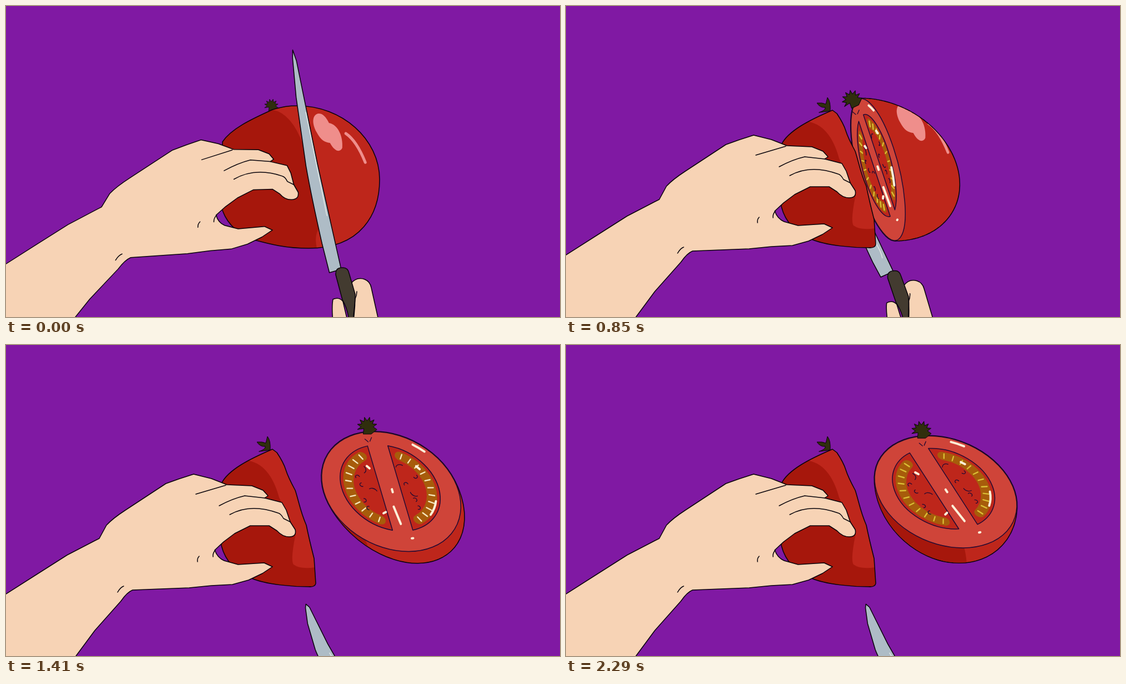
These frames come from a looping animation (998 by 561 pixels, 2370 ms). An HTML page with a canvas:

```html
<!DOCTYPE html>
<html lang="en">
<head>
<meta charset="utf-8">
<title>Slicing a tomato</title>
<style>
html, body { margin: 0; width: 100%; height: 100%; overflow: hidden; background: #8019a3; }
canvas { display: block; }
</style>
</head>
<body>
<canvas id="stage" width="998" height="561"></canvas>
<script>
const ctx = document.getElementById('stage').getContext('2d');
const LOOP = 2370;
const INK = '#08030a', PLUM = '#220a33', RED = '#be261b', DARK = '#a6170c';
const FLESH = '#cf4439', SKIN = '#f7d3b5', BLADE = '#aebcc6', LEAF = '#302e0d';
const PINK = '#ef8e8b', CREAM = '#fdf0d8', AMBER = '#a75c0b';

const { PI, sin, cos } = Math;
const P = d => new Path2D(d);
const lerp = (a, b, t) => a + (b - a) * t;
const span = (t, from, to) => Math.min(1, Math.max(0, (t - from) / (to - from)));
const rand = n => { const v = sin(n * 12.9898) * 43758.5453; return v - Math.floor(v); };

function line(path, color = INK, width = 1.5) {
  ctx.strokeStyle = color;
  ctx.lineWidth = width;
  ctx.stroke(path);
}
function fill(path, color) { ctx.fillStyle = color; ctx.fill(path); }
function shape(path, color, ink = INK, width = 1.5) { fill(path, color); line(path, ink, width); }
function scoped(draw) { ctx.save(); draw(); ctx.restore(); }
function placed(path, matrix) {
  const p = new Path2D();
  p.addPath(path, matrix);
  return p;
}
function arc(r, from, to, y = 0) {
  const p = new Path2D();
  p.arc(0, y, r, from, to);
  return p;
}

// Left hand
const hand = P('M-6 453L55 414L110 379L160 353L168 349L181 325Q192 313 215 298L288 250Q312 241 338 233L370 241L398 252L443 254L463 262L472 272L466 276L497 284L505 298L512 319L521 333Q524 346 510 346Q498 346 488 335L474 326L440 326L412 340L392 355L376 370Q381 384 393 389L418 396L465 393L480 400L462 412L437 424L408 432L370 434L330 438L228 442Q218 446 207 462L160 515L126 561L122 570L-6 570Z');
const creases = P('M342 269L396 253M384 290Q408 277 430 272L466 276M403 306Q440 285 490 303Q495 304 500 313L512 319M377 370Q372 376 373 382M348 381Q344 385 345 391M201 446Q206 437 212 435');

// Tomato before and after the cut
const whole = P('M388 362L390 245C405 222 440 205 480 187C500 181 510 180 525 180C605 180 673 240 673 313C673 375 640 437 545 437C500 437 470 428 440 420C415 408 395 390 388 362Z');
const wholeShade = P('M370 160L480 187Q515 194 535 250L565 400Q553 415 562 445L370 445Z');
const slice = P('M388 362L388 250C400 225 440 205 480 188L488 194Q500 212 504 225Q508 238 521 262C527 280 530 300 541 325Q546 350 555 385L558 430Q557 437 545 436C520 436 470 433 440 420C415 410 395 390 388 362Z');
const sliceLight = P('M433 208Q475 213 492 275L522 340Q512 388 518 396Q530 405 557 401L600 300L480 170Z');
const leaf = P('M456 192Q468 188 467 183Q458 184 452 175Q462 174 468 177L471 165Q477 172 476 189Z');
const gloss = P('M-18 -34C-30 -33 -33 -18 -22 0C-14 14 -6 18 4 19C14 36 24 36 28 28C30 8 20 -14 2 -17C-4 -28 -10 -34 -18 -34Z');
const glint = P('M35 2Q56 15 73 54');

// Knife, with the heel of the blade as its origin
const blade = P('M0 -405L3 -385L5 -195L11 0L-11 2L-14 -50Q-17 -140 -16 -195L-10 -320L-3 -390Z');
const handle = P('M1 8Q0 -5 12 -5Q23 -6 25 5L36 43Q36 68 33 90L25 90Q22 68 13 53Z');
const thumb = P('M-3 103Q-7 68 -4 52Q7 47 14 56L25 103Z');
const finger = P('M29 23Q39 11 53 16Q63 20 65 31L81 103L32 103Z');
const knuckle = P('M39 38Q39 45 36 51L33 83');

// Flesh, drawn in a unit disc with the band along the y axis
const disc = arc(1, 0, 2 * PI);
const CORE = -.06;
const sides = [0, PI];
const pockets = new Path2D(), pulp = new Path2D(), seeds = new Path2D(), curls = new Path2D();
sides.forEach((turn, k) => {
  const pocket = arc(.72, turn - 1.36, turn + 1.36, CORE);
  pocket.closePath();
  pockets.addPath(pocket);
  pulp.addPath(arc(.6, turn - 1.08, turn + 1.08, CORE));
  for (let v = -1.05; v <= 1.06; v += .21) {
    const x = cos(turn + v), y = sin(turn + v);
    seeds.moveTo(x * .56, y * .56 + CORE);
    seeds.lineTo(x * .64, y * .64 + CORE);
  }
  for (let i = 0; i < 6; i++) {
    const x = cos(turn) * (.24 + .2 * rand(i + 9 * k)), y = .13 * i - .38;
    const start = rand(i + 40 + k) * 6, r = i % 3 ? .03 : .07;
    curls.moveTo(x + r * cos(start), y + r * sin(start));
    curls.arc(x, y, r, start, start + (i % 3 ? 3.4 : 1.8));
  }
});
const sparks = P('M-.25 -.43l.03 .04M-.21 .36l.04 -.02M-.03 .25L0 .54M.1 .78h.02M.02 -.04v.05M.48 -.42l.04 .05');
sparks.addPath(arc(.94, -.98, -.78));
sparks.addPath(arc(.66, .35, .75, CORE));

const calyx = P('M7 2L-7 2L-6 -8');
for (let i = 0; i <= 14; i++) {
  const v = lerp(-3.4, .25, i / 14), r = i % 2 ? 11 : 18;
  calyx.lineTo(r * cos(v), r * sin(v) - 11);
}
calyx.closePath();
const dimple = P('M-4 11l6 5M8 8l-3 7');

function star(x, y, turn, size) {
  scoped(() => {
    ctx.translate(x, y);
    ctx.rotate(turn);
    ctx.scale(size, size);
    shape(calyx, LEAF, INK, 1);
  });
}

function knife(t) {
  const push = span(t, 0, 510) ** 2, pull = span(t, 510, 1010);
  const drop = 125 * span(t, 1010, 1330) ** 1.3;
  scoped(() => {
    ctx.translate(593 - 21 * push + 9 * pull + .2 * drop, 477 + push + 8 * pull + drop);
    scoped(() => {
      ctx.rotate(-(10.9 + 4.7 * push + 9 * pull) * PI / 180);
      const size = new DOMMatrix().scale(1 + .18 * pull, 1 - .11 * push - .5 * pull);
      shape(placed(blade, size), BLADE);
      line(P(pull ? 'M2 -60Q5 -40 3 -30' : 'M2 -290L4 -100'), '#dfe3e0', 1.6);
    });
    ctx.rotate(-.1 * pull);
    shape(finger, SKIN);
    shape(handle, '#433b30');
    shape(thumb, SKIN);
    line(knuckle);
  });
}

function highlights(x, y, squeeze) {
  scoped(() => {
    ctx.translate(x, y);
    ctx.scale(squeeze, 1);
    fill(gloss, PINK);
    line(glint, PINK, 7 * squeeze ** 3);
  });
}

// The loose half tips open, then rocks and turns until it rests.
// c: centre, a: along the band, b: across it, dome: centre to the far pole
function pose(t) {
  const open = span(t, 680, 1410) ** 1.15, rest = span(t, 1410, 2290);
  const swing = sin(PI * open);
  const rock = 7 * cos(9 * rest) * (1 - rest ** 2) * open;
  return {
    open, rest,
    spin: .26 * rest ** 2 - .4 * rest * (1 - rest),
    c: [lerp(532, 694, open) + 47 * rest * (1 - rest) - 10 * rest,
      lerp(309, 261, open) - 10 * swing + .5 * rock + 4 * rest],
    a: [32 + 15 * swing, lerp(125, 101, open) + rock],
    b: [lerp(6, 124, open) - .4 * rock, -69 * swing - 1],
    dome: [lerp(143, 39, open ** 1.8) - 39 * rest, (78 - 1.2 * rock) * open ** 3]
  };
}

// A dome is the union of its shrinking slices
function domePath({ a, b, c, dome }) {
  const p = new Path2D();
  for (let i = 0; i < 120; i++) {
    const r = cos(i / 240 * PI), s = sin(i / 240 * PI);
    p.addPath(disc, new DOMMatrix([b[0] * r, b[1] * r, a[0] * r, a[1] * r,
      c[0] + dome[0] * s, c[1] + dome[1] * s]));
  }
  return p;
}

function half(t) {
  const k = pose(t), { open, rest, c } = k;
  const skin = domePath(k);
  line(skin, INK, 3);
  fill(skin, RED);
  scoped(() => {
    ctx.clip(skin);
    const x = c[0] - 36 + 75 * rest - 200 * (1 - open);
    fill(P(`M400 150H${x - 40}L${x - 12} 350Q${x - 2} 365 ${x} 410H400Z`), DARK);
    if (open < .7) highlights(c[0] + 48 + 62 * open, c[1] - 81 - 22 * open, 1 - .5 * open);
  });

  const rim = new DOMMatrix([...k.b, ...k.a, ...c]);
  const cut = open > .1;
  shape(placed(disc, rim), cut ? FLESH : RED, PLUM);
  if (!cut) return;

  const inner = rim.rotate(-k.spin * 180 / PI);
  const cells = placed(pockets, inner);
  fill(cells, RED);
  scoped(() => {
    ctx.transform(inner.a, inner.b, inner.c, inner.d, inner.e, inner.f);
    line(pulp, AMBER, .15);
  });
  line(placed(seeds, inner), open === 1 && rest < .6 ? '#f6e6bb' : '#d9bd35', 2.4);
  line(cells, PLUM);
  line(placed(curls, inner), PLUM, 1.3);
  line(placed(sparks, inner), CREAM, 4);

  const top = rim.transformPoint(new DOMPoint(-.1, -.98));
  star(top.x, top.y, -.55 * (1 - open), 1);
  line(placed(dimple, new DOMMatrix().translate(top.x, top.y)), PLUM, 1.3);
}

function draw(t) {
  ctx.lineJoin = ctx.lineCap = 'round';
  ctx.fillStyle = '#8019a3';
  ctx.fillRect(0, 0, 998, 561);

  if (t < 850) star(lerp(478, 474, span(t, 0, 510)), 188, 0, .7);
  else shape(leaf, LEAF, INK, 1);

  if (t < 510) {
    fill(whole, RED);
    scoped(() => { ctx.clip(whole); fill(wholeShade, DARK); });
    line(whole);
    highlights(580, 228, .92);
    knife(t);
  } else {
    knife(t);
    half(t);
    fill(slice, DARK);
    scoped(() => { ctx.clip(slice); fill(sliceLight, RED); });
    line(slice);
  }

  // The arm swings up around the fingertips
  const low = 1 - span(t, 0, 850);
  scoped(() => {
    ctx.transform(1, -.03 * low, -.08 * low, 1, 32 * low, 18.6 * low);
    shape(hand, SKIN);
    line(creases);
  });
}

// Held drawings: 170 ms each up to 850, then 80 ms
const held = t => t < 850 ? Math.floor(t / 170) * 170 : 850 + Math.floor((t - 850) / 80) * 80;
const start = performance.now();
let shown = -1;
function tick() {
  const t = held((performance.now() - start) % LOOP);
  if (t !== shown) draw(shown = t);
  requestAnimationFrame(tick);
}
tick();
</script>
</body>
</html>
```
